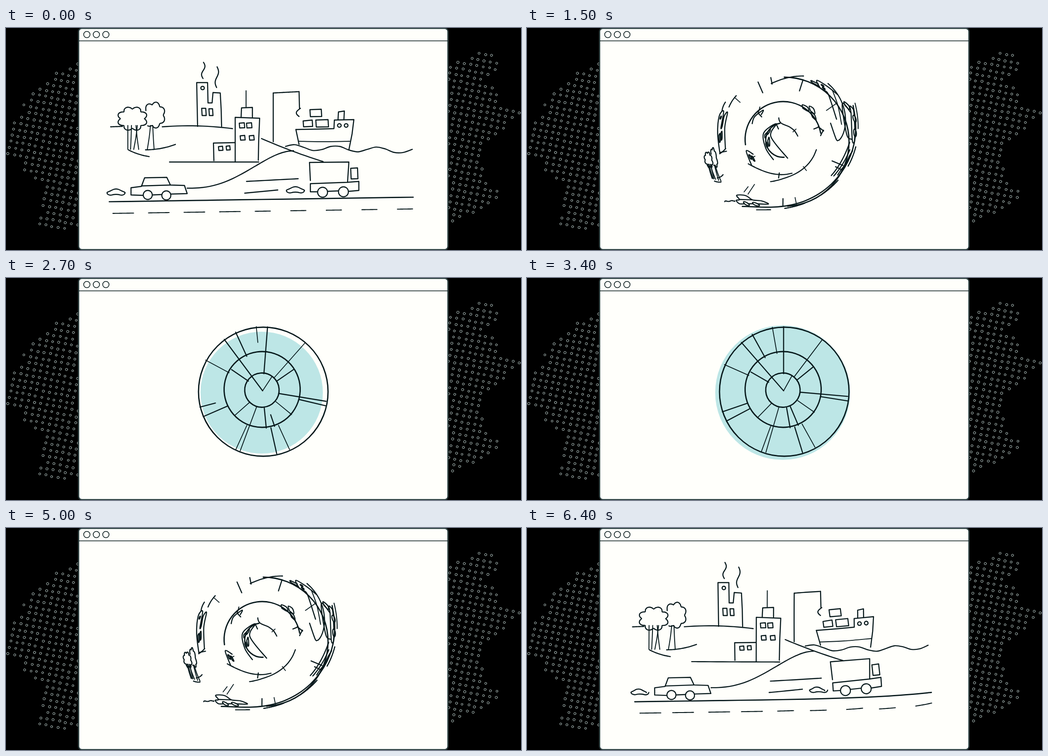
These frames come from a looping animation (1137 by 492 pixels, 6500 ms). An HTML page with a canvas:

```html
<!DOCTYPE html>
<html lang="en">
<head>
<meta charset="utf-8">
<title>Sketch loop</title>
<style>
html, body { margin: 0; width: 100%; height: 100%; overflow: hidden; background: #000; }
canvas { display: block; width: 1137px; height: 492px; }
</style>
</head>
<body>
<canvas id="stage" width="1137" height="492"></canvas>
<script>
const INK = '#06181b', PAPER = '#fffffb', TEAL = '#bde6e6';
const TAU = Math.PI * 2, RAD = Math.PI / 180, CX = 567, CY = 250;
const { sin, cos, abs, hypot, atan2 } = Math;
const ctx = document.getElementById('stage').getContext('2d');

const clamp = (v) => Math.min(1, Math.max(0, v));
const smooth = (v) => { v = clamp(v); return v * v * (3 - 2 * v); };
const mix = (a, b, k) => a + (b - a) * k;
const noise = (i) => { const v = sin(i * 127.1) * 43758.5; return v - Math.floor(v); };
const pairs = (v) => v.flatMap((x, i) => i % 2 ? [] : [[x, v[i + 1]]]);
const sample = (fn, n = 14) => Array.from({ length: n + 1 }, (_, i) => fn(i / n));

// ---- scene: strokes drawn straight, each with a way to bend ----

const strokes = [];
let pose, lag;

// Bends around a pivot: shift, turn, and bow along both axes.
function part(delay, px, py, dx, dy, turn, bowX = 0, bowY = 0) {
  lag = delay;
  pose = (x, y, e) => {
    const u = x - px, v = y - py, a = turn * RAD * e;
    const uu = u + e * bowX * (v / 100) ** 2, vv = v + e * bowY * (u / 100) ** 2;
    return [px + dx * e + uu * cos(a) - vv * sin(a), py + dy * e + uu * sin(a) + vv * cos(a)];
  };
}

function add(pts, curved, pen = 2.4) {
  const bend = pose;
  strokes.push({ lag, curved, pen, at: (e) => pts.map(([x, y]) => bend(x, y, e)) });
}
const poly = (...v) => add(pairs(v), false);
const curl3 = (...v) => add(pairs(v), true, 2);
const ring = (x, y, r) => add(sample((s) => [x + r * cos(s * TAU), y + r * sin(s * TAU)]), true);
const box = (x, y, w, h, lean = 0) =>
  poly(x, y + lean, x + w, y, x + w + 1, y + h, x + 1, y + h + lean / 2, x, y + lean);

// Free stroke between two parametric lines.
function morph(from, to, pen = 2.4) {
  strokes.push({
    lag, pen, curved: true,
    at: (e) => sample((s) => { const a = from(s), b = to(s); return [mix(a[0], b[0], e), mix(a[1], b[1], e)]; }),
  });
}
const bow = (x0, y0, x1, y1, sag = 0) => (s) => {
  const dx = x1 - x0, dy = y1 - y0, k = sag * 4 * s * (1 - s) / (hypot(dx, dy) || 1);
  return [x0 + dx * s - dy * k, y0 + dy * s + dx * k];
};
const dot = (x, y) => () => [x, y];

function factory() {
  part(1.6, 449, 218, 2, 0, 8, 6);
  poly(423, 218, 422, 170, 421, 121, 445, 121, 446, 166, 455, 166, 457, 143, 473, 144, 475, 180, 476, 218);
  ring(434, 133, 3.8);
  box(432, 178, 9, 16);
  box(448, 179, 8, 15);
  const smoke = (x, y, h) => (s) => [x + 3.5 * sin(s * TAU) - s, y + h * s];
  morph(smoke(436, 76, 36), bow(470, 88, 457, 114, 4));
  morph(smoke(466, 86, 46), bow(513, 109, 491, 132, 3));
  morph(bow(345, 219, 500, 223, -4), bow(423, 214, 480, 222));
  morph(bow(231, 219, 257, 218), dot(296, 222));
}

function trees() {
  const leaves = (x, y, w, h, from, to, lobes) => add(sample((s) => {
    const a = mix(from, to, s) * RAD, k = 0.86 + 0.22 * abs(sin(a * lobes / 2));
    return [x + w * k * cos(a), y + h * k * sin(a)];
  }, 48), true);
  part(1.9, 300, 270, 15, 2, 18, 4);
  leaves(279, 201, 31, 25, 0, 360, 8);
  leaves(327, 193, 23, 27, -155, 125, 7);
  for (const [top, foot] of [[269, 269], [277, 275], [290, 282], [287, 293], [319, 312], [324, 327]])
    curl3(top, 216, mix(top, foot, 0.4), 242, foot, 269);
  morph(bow(270, 270, 316, 285, 2), bow(293, 273, 337, 282, 2));
  morph(bow(308, 270, 374, 258, 3), bow(326, 266, 383, 262, 2));
}

function tower() {
  part(1.6, 507, 295, 0, -3, 3, 4);
  poly(506, 297, 506, 250, 506, 198, 560, 200, 558, 245, 557, 293);
  poly(519, 198, 520, 177, 544, 176, 544, 198);
  curl3(530, 139, 530, 158, 530, 175);
  for (const x of [515, 531]) {
    box(x, 210, 11, 11, 1);
    box(x + 4 * (x > 520) + 2, 238, 10, 10, 1);
  }
  part(1.6, 505, 297, 2, -8, 20);
  poly(459, 294, 458, 255, 505, 254);
  box(469, 262, 9, 9, 1);
  box(486, 261, 8, 9, 1);
  morph(bow(361, 297, 558, 297), bow(447, 266, 558, 295, 5));
}

function crane() {
  lag = 1.6;
  morph(bow(590, 252, 590, 144), bow(584, 252, 588, 160, -6));
  morph(bow(590, 144, 647, 141), bow(588, 160, 681, 124, -8));
  morph(bow(647, 141, 648, 178), dot(681, 124));
  morph((s) => [650 - 9 * sin(s * 2.8), 178 + 18 * s], dot(681, 124));
}

function ship() {
  part(1.15, 703, 254, 8, -24, -48, 0, -12);
  poly(640, 225, 690, 224, 724, 223, 725, 204, 768, 203, 764, 235, 757, 270);
  poly(640, 225, 647, 258);
  curl3(647, 251, 700, 252, 759, 251);
  poly(733, 203, 734, 186, 747, 184, 746, 203);
  ring(736, 216, 4);
  ring(751, 216, 4);
  box(656, 204, 20, 14, 2);
  box(684, 203, 27, 16, 1);
  box(671, 180, 25, 16, 1);
  morph((s) => {
    const x = mix(617, 897, s);
    return [x, 264 + 8 * s - 6 * cos((x - 636) / 92 * TAU)];
  }, (s) => {
    const a = mix(2.51, -0.39, s), r = 86 + 18 * (1 - s) ** 3 + 6 * s ** 3;
    return [668 + r * cos(a), 190 + r * sin(a)];
  });
}

function hill() {
  lag = 1.15;
  morph((s) => [mix(400, 635, s), mix(355, 272, smooth(s ** 1.3))],
    (s) => [mix(480, 603, s), mix(342, 281, s ** 1.4)]);
  morph(bow(564, 245, 700, 296, 2), bow(640, 273, 675, 270));
}

// A lumpy cloud that flattens into a wavy trail.
const puff = (x, y, x2, y2, half, slope) => morph((s) => {
  const a = s * TAU;
  return [x + 20 * cos(a), y + 6 * sin(a) * (1 + 0.4 * sin(3 * a))];
}, (s) => {
  const u = half * cos(s * Math.PI);
  return [x2 + u, y2 + u * slope + 1.6 * sin(s * 14)];
});

function car() {
  part(1.15, 334, 370, 74, 0, -2);
  poly(303, 371, 276, 370, 276, 354, 299, 351, 306, 332, 355, 331, 363, 348, 394, 349, 400, 367, 365, 368);
  poly(299, 350, 363, 348);
  poly(323, 370, 344, 369);
  ring(313, 370, 10);
  ring(354, 371, 10);
  puff(243, 365, 305, 359, 33, 0);
}

function truck() {
  part(1.15, 722, 364, 51, -65, -48);
  poly(672, 338, 670, 298, 757, 297, 754, 342);
  poly(687, 363, 672, 363, 672, 345, 753, 342, 779, 340, 779, 360, 757, 362);
  poly(710, 362, 733, 361);
  box(761, 310, 15, 24, 1);
  ring(699, 364, 11);
  ring(745, 363, 11);
  puff(639, 360, 679, 357, 40, -0.16);
  morph(bow(531, 340, 645, 334), bow(611, 332, 703, 319, 2));
  morph(bow(527, 366, 600, 359), bow(622, 348, 700, 337, 2));
}

function road() {
  lag = 1.15;
  const flat = (s, off = 0) => [mix(228, 899, s), 385 - 10 * s + off];
  const rise = (s, off = 0) => {
    const a = atan2(-143 * 5.5 * s ** 4.5, 469);
    return [mix(352, 821, s) - off * sin(a), 386 - 143 * s ** 5.5 + off * cos(a)];
  };
  morph((s) => flat(s), (s) => rise(s), 2.7);
  for (let i = 0; i < 9; i++) {
    const a = 0.012 + i * 0.117, b = 0.107 + (i >> 1) * 0.2;
    const len = i < 4 ? 0.068 : 0.05;
    morph((s) => flat(a + len * s, 26), (s) => rise(b + 0.11 * s, 18), 2.1);
  }
}

[factory, trees, tower, crane, ship, hill, car, truck, road].forEach((make) => make());

// ---- drawing ----

function trace(p, curved) {
  const at = (i) => p[Math.min(p.length - 1, Math.max(0, i))];
  ctx.beginPath();
  ctx.moveTo(...p[0]);
  for (let i = 0; i < p.length - 1; i++) {
    const [a, b, c, d] = [at(i - 1), at(i), at(i + 1), at(i + 2)];
    if (!curved) ctx.lineTo(...c);
    else ctx.bezierCurveTo(b[0] + (c[0] - a[0]) / 6, b[1] + (c[1] - a[1]) / 6,
      c[0] - (d[0] - b[0]) / 6, c[1] - (d[1] - b[1]) / 6, c[0], c[1]);
  }
}

function circle(x, y, r, from = 0, span = 360) {
  ctx.beginPath();
  ctx.arc(x, y, r, from * RAD, (from + span) * RAD);
}

function ink(w, color = INK) {
  ctx.lineWidth = w;
  ctx.strokeStyle = color;
  ctx.stroke();
}

function fill(color) {
  ctx.fillStyle = color;
  ctx.fill();
}

// Pulls points around the centre onto the nearest ring.
function curl(pts, k) {
  let last = null;
  const polar = pts.map(([x, y]) => {
    let a = atan2(y - CY, x - CX);
    if (last !== null) a += Math.round((last - a) / TAU) * TAU;
    last = a;
    return [hypot(x - CX, y - CY), a];
  });
  const mean = polar.reduce((sum, p) => sum + p[0], 0) / polar.length;
  const target = mean > 115 ? 143 : mean > 60 ? 84 : 38;
  return polar.map(([r, a]) => {
    const rr = mix(r, target, k), aa = a - k * 0.6;
    return [CX + rr * cos(aa), CY + rr * sin(aa)];
  });
}

function drawScene(n) {
  const bend = Math.min(1, n / 9), k = smooth((n - 9) / 9);
  for (const s of strokes) {
    let p = s.at(bend ** s.lag);
    if (k > 0) p = curl(p, k);
    trace(p, s.curved || k > 0.3);
    ink(s.pen);
  }
}

// Spoke angles by the radii they span.
const spokes = [
  [38, 142, [-79, -42, 16, 117, 240]],
  [84, 143, [20, 72, 84, 121, 163, 215, 252]],
  [38, 83, [-28, 46, 91, 145, 221]],
  [0, 38, [240, -50]],
];
const lateSpokes = [[84, 143, [172, 271]], [38, 83, [78]]];

function drawSpokes(sets, turn, reach) {
  for (const [r0, r1, angles] of sets) angles.forEach((deg, i) => {
    const a = (deg - turn) * RAD, inner = mix(r1, r0, reach);
    trace([r1, inner].map((r) => [566.5 + r * cos(a), 250 + r * sin(a)]));
    ink(i % 2 ? 1.8 : 2.4);
  });
}

function drawWheel(n) {
  const turn = 1.1 * (n - 21), grow = clamp((n - 13) / 4), open = 1 - clamp((n - 21) / 4);
  for (const [x, y, r, start, gap] of [[568, 252, 143, -90, 6], [565.5, 247, 84, 172, 3], [565, 248.5, 38, 86, 11]]) {
    circle(x, y, r, start, (360 - gap * open) * grow);
    ink(2.8);
  }
  drawSpokes(spokes, turn, clamp((n - 14) / 4));
  if (n > 24) drawSpokes(lateSpokes, turn, clamp((n - 24) / 5));
  if (n > 17 && n < 24) for (const a of [-108, 5, 132]) {
    circle(568, 253, 150, a, 17);
    ink(1.8);
  }
}

// Rough halftone dots inside two ragged patches.
function drawDots() {
  const left = [160, 76, 110, 97, 36, 165, 40, 190, 10, 216, 0, 280, 38, 286, 30, 322, 88, 343, 72, 380, 85, 405, 67, 434, 120, 446, 160, 438];
  const right = [976, 76, 1071, 46, 1097, 80, 1058, 118, 1090, 142, 1090, 165, 1137, 186, 1095, 230, 1060, 255,
    1050, 295, 1062, 335, 1090, 364, 1085, 385, 1020, 415, 976, 435];
  for (const edge of [left, right]) {
    const area = new Path2D('M' + edge.join(' ') + 'Z');
    for (let i = -50; i < 100; i++) for (let j = -50; j < 60; j++) {
      const seed = i * 61 + j;
      const x = 4 + 13.7 * i + 2.7 * j + noise(seed) * 2, y = 277 + 2.7 * i - 13.7 * j + noise(seed + 0.5) * 2;
      if (!ctx.isPointInPath(area, x, y)) continue;
      circle(x, y, 2.1 + 0.6 * noise(seed + 0.3));
      ink(1, '#c3d6d3');
    }
  }
}

function drawWindow() {
  ctx.beginPath();
  ctx.roundRect(160.5, 1, 815, 490, 7);
  fill(PAPER);
  ink(2.4, '#8fa5a4');
  ink(1.5);
  trace([[161, 28.5], [975, 28.5]]);
  ink(1.5);
  for (const x of [178.5, 199.5, 220.5]) {
    circle(x, 14.5, 7);
    ink(1.6);
  }
}

function draw(step) {
  const n = Math.min(step, 65 - step); // there and back
  ctx.clearRect(0, 0, 1137, 492);
  drawDots();
  drawWindow();
  const r = 149 * smooth((n - 18.4) / 10.6);
  if (r > 0) {
    circle(564.5, 254, r);
    fill(TEAL);
  }
  if (n < 18) drawScene(n);
  if (n > 13) drawWheel(n);
}

ctx.lineCap = ctx.lineJoin = 'round';
let shown = -1;
function tick() {
  const step = Math.floor(performance.now() % 6500 / 100);
  if (step !== shown) draw(shown = step);
  requestAnimationFrame(tick);
}
tick();
</script>
</body>
</html>
```
